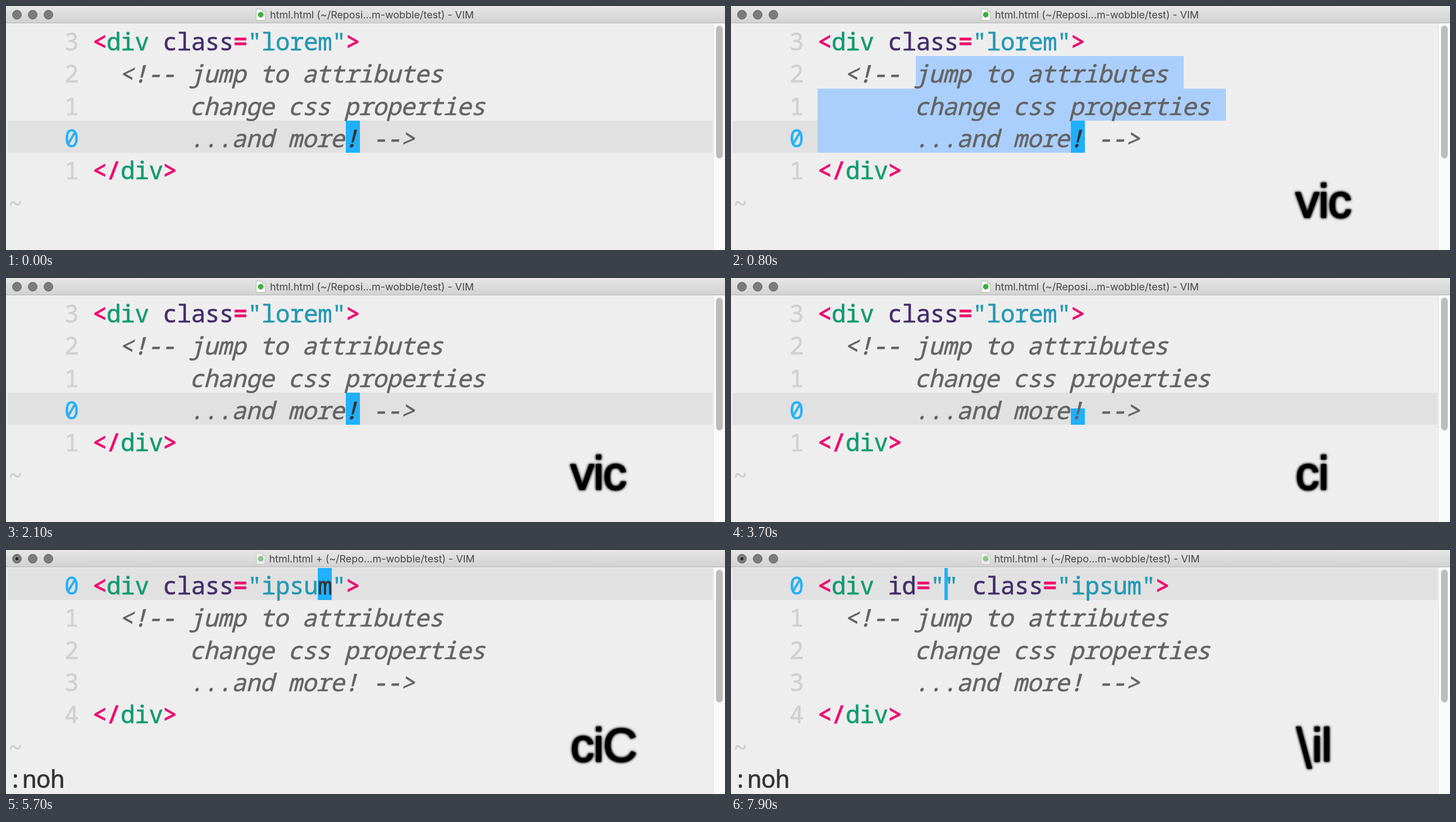
Write an HTML page that moves like this. It is 1280 px wide and 434 px high and loops after 8 s.

```html
<!DOCTYPE html>
<html lang="en">
<head>
<meta charset="utf-8">
<title>Editor demo</title>
<style>
  html, body { margin: 0; width: 100%; height: 100%; overflow: hidden; background: #eee; }
  svg { display: block; width: 1280px; height: 434px; }
  text { white-space: pre; }
  .code {
    font: 400 43px "Noto Sans Mono", "DejaVu Sans Mono", monospace; letter-spacing: -.74px;
    fill: currentColor; stroke: currentColor; stroke-width: .6;
  }
  .mark { color: #f00b6e; stroke-width: 1.3; }
  .tag { color: #129b70; }
  .attr { color: #432d6b; }
  .str { color: #2499b3; }
  .note { color: #646464; font-style: italic; transform: translateX(-3px); }
  .num { color: #d0d0d0; }
  .tilde { color: #d0d0d0; transform: translateY(3px); }
  .now { color: #20b0fc; }
  .ink { color: #343434; }
  #editor rect { shape-rendering: crispEdges; }
  .caret { fill: #20b0fc; }
  .row { fill: #e1e1e1; }
  .sel { fill: #abcffc; }
  .title { font: 400 17.95px Inter, "Open Sans", sans-serif; fill: #464646; text-anchor: middle; }
  .keys {
    font: 84px "Liberation Sans", Arial, sans-serif; letter-spacing: -1.3px;
    stroke: #000; stroke-width: 1.6; stroke-linejoin: round;
    filter: drop-shadow(0 0 2px #000) drop-shadow(0 0 1.5px rgba(0, 0, 0, .7));
  }
  .slash { font-family: Inter, sans-serif; baseline-shift: -3px; }
</style>
</head>
<body>
<svg viewBox="0 0 1280 434">
  <defs>
    <linearGradient id="bar" x2="0" y2="1">
      <stop stop-color="#e6e6e6"/><stop offset="1" stop-color="#d2d2d2"/>
    </linearGradient>
  </defs>
  <rect width="1280" height="434" fill="#eee"/>
  <rect width="1280" height="30" fill="url(#bar)"/>
  <rect y="29.5" width="1280" height="1.2" fill="#b9b9b9"/>
  <g fill="#7b7b7b" stroke="#666">
    <circle cx="19.5" cy="15.5" r="8"/><circle cx="47.5" cy="15.5" r="8"/><circle cx="75.5" cy="15.5" r="8"/>
  </g>
  <circle id="dot" cx="19.5" cy="15.5" r="2.6" fill="#222"/>
  <g id="icon">
    <path d="M445.5 5.5h11l5 5v15h-16z" fill="#fff" stroke="#b4b4b4"/>
    <path d="M456.5 5.5v5h5" fill="#e4e4e4" stroke="#b4b4b4"/>
    <circle cx="453.5" cy="15.5" r="5" fill="#3fae3c"/>
  </g>
  <text id="title" class="title" x="651.5" y="22"></text>
  <rect x="1259" y="31" width="21" height="403" fill="#fafafa"/>
  <rect x="1259" y="31" width="1" height="403" fill="#e2e2e2"/>
  <rect x="1264" y="35" width="12" height="236" rx="6" fill="#bcbcbc"/>
  <g id="editor"></g>
  <text id="keys" class="keys" x="1005" y="376"></text>
</svg>
<script>
const LOOP = 8000, CELL = 25.06, LINE = 57.25;
const colX = c => 154 + c * CELL;
const rowY = r => 32 + r * LINE;
const byId = id => document.getElementById(id);

const comment = ["  <!-- jump to attributes", "       change css properties", "       ...and more! -->"];

// Each step adds to the state before it.
const steps = [
  [0, { keys: "", word: "lorem", line: 3, at: 18, caret: "block", visual: 0, id: false, edited: false }],
  [500, { keys: "v", visual: 1 }],
  [600, { keys: "vi" }],
  [700, { keys: "vic", visual: 2 }],
  [2000, { visual: 0 }],
  [3500, { keys: "c", caret: "half" }],
  [3700, { keys: "ci" }],
  [3900, { keys: "ciC", word: "", line: 0, at: 12, caret: "bar", edited: true }],
  [4700, { word: "i", at: 13 }],
  [4900, { word: "ip", at: 14 }],
  [5000, { word: "ips", at: 15 }],
  [5200, { word: "ipsu", at: 16 }],
  [5400, { word: "ipsum", at: 17 }],
  [5500, { at: 16, caret: "block" }],
  [6400, { keys: "" }],
  [7300, { keys: "\\" }],
  [7700, { keys: "\\i" }],
  [7800, { keys: "\\il", id: true, at: 9, caret: "bar" }]
];
const states = [];
steps.forEach(([time, change], i) => states.push({ ...states[i - 1], ...change, time }));

const esc = s => s.replace(/&/g, "&amp;").replace(/</g, "&lt;");
const rect = (cls, x, y, w, h) => `<rect class="${cls}" x="${x}" y="${y}" width="${w}" height="${h}"/>`;
const cells = (cls, r, from, to) => rect(cls, colX(from), rowY(r), (to - from) * CELL, LINE);

// Places coloured runs one after another on the character grid.
function write(r, c, runs) {
  return runs.map(([cls, s]) => {
    const out = `<text class="code ${cls}" x="${colX(c)}" y="${rowY(r) + 47}">${esc(s)}</text>`;
    c += s.length;
    return out;
  }).join("");
}

const attribute = (name, value) => [["attr", " " + name], ["mark", "="], ["str", `"${value}"`]];

function caret(s) {
  const x = colX(s.at), y = rowY(s.line);
  if (s.caret === "half") return rect("caret", x, y + LINE / 2, CELL, LINE / 2);
  if (s.caret === "bar") return rect("caret", x, y, 6.5, LINE);
  const char = s.line ? ["note", "!"] : ["ink", "m"];
  return cells("caret", s.line, s.at, s.at + 1) +
    write(s.line, s.at, [char]).replace("<text", '<text style="color:#333"');
}

function editor(s) {
  let out = rect("row", 3, rowY(s.line), s.visual ? 151 : 1255, LINE);
  if (s.visual === 2) {
    out += cells("sel", 1, 7, 26) + cells("sel", 2, 0, 29) + cells("sel", 3, 0, 18);
  }
  if (s.caret === "half") out += caret(s);
  for (let r = 0; r < 5; r++) {
    out += write(r, -2, [[r === s.line ? "now" : "num", String(Math.abs(r - s.line))]]);
  }
  out += write(0, 0, [["mark", "<"], ["tag", "div"], ...(s.id ? attribute("id", "") : []),
    ...attribute("class", s.word), ["mark", ">"]]);
  comment.forEach((text, i) => {
    const indent = text.search(/\S/);
    out += write(i + 1, indent, [["note", text.slice(indent)]]);
  });
  out += write(4, 0, [["mark", "</"], ["tag", "div"], ["mark", ">"]]);
  out += write(5, -6, [["tilde", "~"]]);
  if (s.edited) out += write(6, -6, [["ink", ":noh"]]);
  return s.caret === "half" ? out : out + caret(s);
}

function render(s) {
  byId("editor").innerHTML = editor(s);
  byId("keys").innerHTML = s.keys.replace("\\", '<tspan class="slash">\\</tspan>');
  byId("title").textContent = `html.html ${s.edited ? "+ (~/Repo" : "(~/Reposi"}...m-wobble/test) - VIM`;
  byId("dot").style.opacity = s.edited ? 1 : 0;
  byId("icon").style.opacity = s.edited ? .5 : 1;
}

const start = performance.now();
let shown;
function tick() {
  const t = (performance.now() - start) % LOOP;
  const state = states.findLast(s => s.time <= t) || states[0];
  if (state !== shown) render(shown = state);
  requestAnimationFrame(tick);
}
tick();
</script>
</body>
</html>
```
